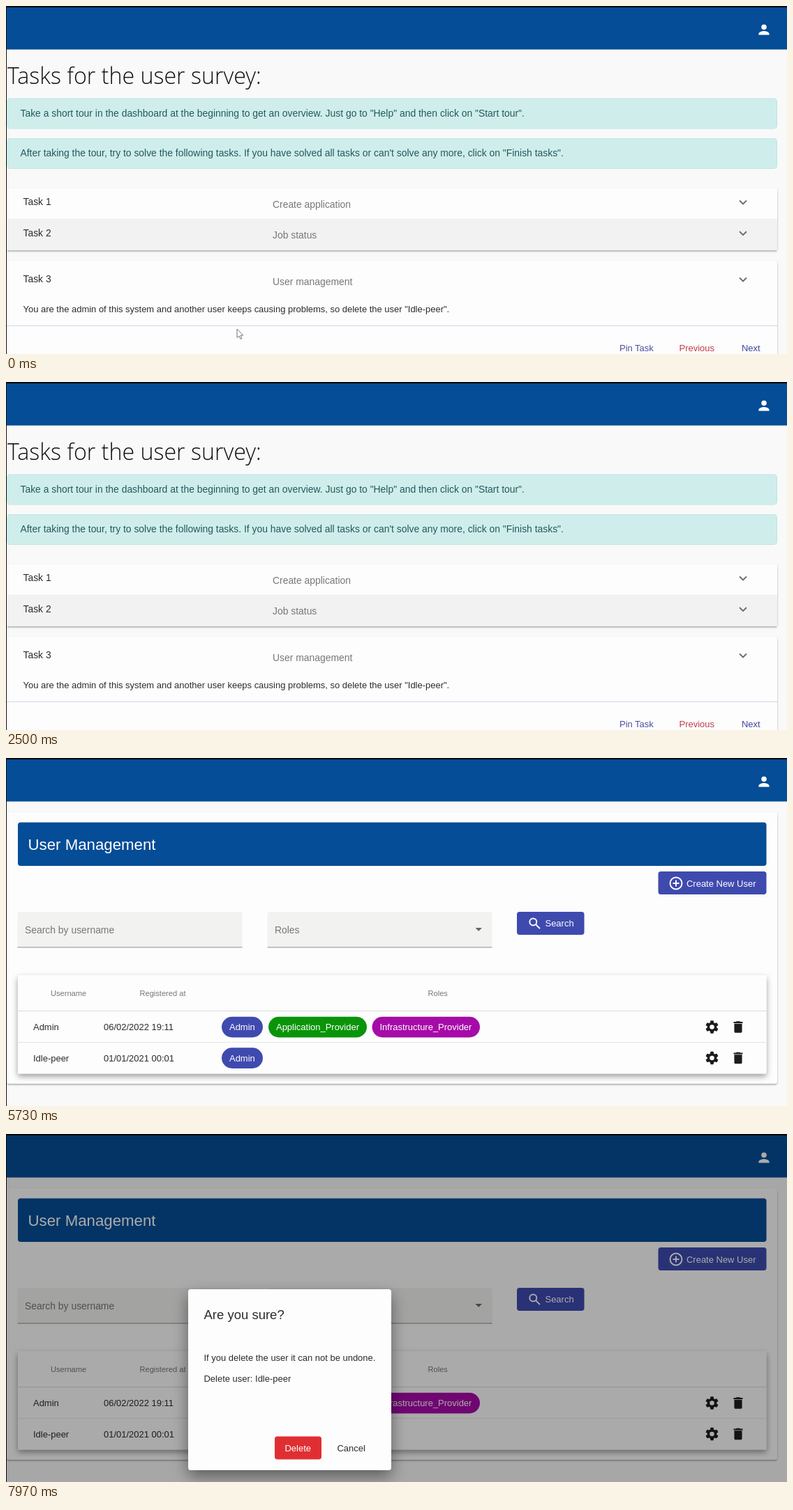
An HTML page that plays this animation: 1119 by 500 pixels, repeating every 8000 ms.

```html
<!DOCTYPE html>
<html lang="en">
<head>
<meta charset="utf-8">
<title>User management tasks</title>
<style>
html, body { margin: 0; width: 100%; height: 100%; overflow: hidden; background: #f9f9f9; }
svg { display: block; width: 1119px; height: 500px; font-family: "Liberation Sans", Arial, sans-serif; }
.heading { font-family: "Open Sans", "Noto Sans", sans-serif; font-weight: 300; }
</style>
</head>
<body>
<svg id="stage" viewBox="0 0 1119 500">
  <defs>
    <filter id="low" x="-5%" y="-10%" width="110%" height="125%">
      <feDropShadow dx="0" dy="1.5" stdDeviation="1.2" flood-color="#303050" flood-opacity=".42"/>
    </filter>
    <filter id="high" x="-5%" y="-15%" width="110%" height="140%">
      <feDropShadow dx="0" dy="4" stdDeviation="4.5" flood-opacity=".38"/>
    </filter>
    <filter id="modal" x="-20%" y="-20%" width="140%" height="150%">
      <feDropShadow dx="0" dy="9" stdDeviation="11" flood-opacity=".45"/>
    </filter>
    <path id="trash" transform="scale(.927) translate(-12 -12)" d="M6 19c0 1.1.9 2 2 2h8c1.1 0 2-.9 2-2V7H6zM19 4h-3.500l-1-1h-5l-1 1H5v2h14z"/>
    <path id="person" transform="scale(.95) translate(-12 -12)" d="M12 12a4 4 0 1 0 0-8a4 4 0 0 0 0 8zm0 2c-2.670 0-8 1.340-8 4v2h16v-2c0-2.660-5.330-4-8-4z"/>
    <g id="gear"></g>
  </defs>
  <rect width="1119" height="500" fill="#f9f9f9"/>
  <g id="tasks"></g>
  <g id="users"></g>
  <g id="bar"></g>
  <rect id="dim" y="2" width="1119" height="498"/>
  <g id="dialog"></g>
  <g id="cursor" fill="#fdfdfd" stroke="#77777c" stroke-width="1" stroke-linejoin="round">
    <path id="arrow" d="M0 0V12.500L3 10L5 14.500L7 13.600L5 9.200H8.700Z"/>
    <path id="hand" d="M-1.500 8V1Q-1.500-.5 0-.5T1.500 1V6L6.500 7Q8.500 7.500 8.500 9L7.500 14V16.500H0L-5 11Q-6 8.500-4 8.500L-1.500 10Z"/>
  </g>
</svg>
<script>
const LOOP = 8000;
const BODY = 13.9, SMALL = 12.98, HEADER = 11.1;
const BLUE = '#054d97', INDIGO = '#3f4aaf', CARD = '#fdfdfd', INK = '#2c2c2c', MUTED = '#777';
const TARGET_USER = 'Idle-peer';
const $ = id => document.getElementById(id);

const text = (x, y, label, size = SMALL, fill = INK, extra = '') =>
  `<text x="${x}" y="${y}" font-size="${size}" fill="${fill}" ${extra}>${label}</text>`;
const box = (x, y, w, h, fill, r = 0, extra = '') =>
  `<rect x="${x}" y="${y}" width="${w}" height="${h}" rx="${r}" fill="${fill}" ${extra}/>`;
const line = (x1, x2, y, color) =>
  `<path d="M${x1} ${y}H${x2}" stroke="${color}"/>`;
const icon = (id, x, y, fill) => `<use href="#${id}" x="${x}" y="${y}" fill="${fill}"/>`;
const chevron = y =>
  `<path d="M1051 ${y - 2.5}l5 5l5-5" fill="none" stroke="#6a6a6a" stroke-width="1.800"/>`;

const alertBox = (y, label) =>
  box(1.5, y + .5, 1103, 43, '#cfeeeb', 4, 'stroke="#bfe4e6"') +
  text(20.5, y + 26, label, BODY, '#24595c');
const taskRow = (y, number, label) =>
  text(24.5, y, 'Task ' + number, BODY) + text(382, y + 3.5, label, BODY, MUTED) + chevron(y - 4);
const field = (x, label) =>
  `<path d="M${x} 272V225q0-4 4-4h314q4 0 4 4v47z" fill="#f2f2f1"/>` +
  line(x, x + 322, 272, '#8d8d8d') + text(x + 10.5, 252, label, BODY, MUTED);
const chip = (x, y, w, label, fill) =>
  box(x, y, w, 29.6, fill, 14.8) + text(x + 11, y + 19.2, label, SMALL, '#fff');
const userRow = (y, name, date) =>
  text(39, y, name) + text(140, y, date) + chip(309, y - 19.2, 59, 'Admin', INDIGO) +
  icon('gear', 1011.5, y - 4.5, '#1c1c1c') + icon('trash', 1049, y - 4.5, '#1c1c1c');

$('gear').innerHTML =
  '<path fill-rule="evenodd" d="M-6.700 0a6.700 6.700 0 1 0 13.400 0a6.700 6.700 0 1 0-13.400 0zM-3.300 0a3.300 3.300 0 1 1 6.600 0a3.300 3.300 0 1 1-6.600 0z"/>' +
  Array.from({length: 6}, (_, i) =>
    `<path transform="rotate(${i * 60})" d="M-2.800-5.500L-2-9.200H2L2.800-5.500z"/>`).join('');

$('bar').innerHTML =
  box(0, 0, 1119, 62.5, BLUE) + box(0, 0, 1119, 2, '#050505') + box(0, 0, 1, 500, '#111') +
  icon('person', 1086, 34, '#fff');

$('tasks').innerHTML =
  text(2, 111.5, 'Tasks for the user survey:', 32.2, '#111', 'class="heading"') +
  alertBox(132.5, 'Take a short tour in the dashboard at the beginning to get an overview. Just go to "Help" and then click on "Start tour".') +
  alertBox(190, 'After taking the tour, try to solve the following tasks. If you have solved all tasks or can\'t solve any more, click on "Finish tasks".') +
  box(1, 262, 1104, 89, CARD, 3, 'filter="url(#low)"') +
  box(1, 305.5, 1104, 45.5, '#f2f2f2') +
  taskRow(286, 1, 'Create application') +
  taskRow(330.5, 2, 'Job status') +
  box(1, 366, 1104, 150, CARD, 4, 'filter="url(#low)"') +
  taskRow(397, 3, 'User management') +
  text(24.5, 439.5, `You are the admin of this system and another user keeps causing problems, so delete the user "${TARGET_USER}".`) +
  line(1, 1105, 459.5, '#d3d3ee') +
  text(879, 496, 'Pin Task', SMALL, '#4a4f9c') +
  text(964.5, 496, 'Previous', SMALL, '#c23a48') +
  text(1054, 496, 'Next', SMALL, '#41479a');

$('users').innerHTML =
  box(1, 78, 1104, 390, CARD, 4, 'filter="url(#low)"') +
  box(17, 92.5, 1072.5, 62.5, BLUE, 4) +
  text(31.5, 131.5, 'User Management', 22.25, '#fff') +
  box(934.5, 163, 155, 33, INDIGO, 3.7) +
  '<path d="M951.500 180a8.500 8.500 0 1 0 17 0a8.500 8.500 0 1 0-17 0M960 175.500v9M955.500 180h9" fill="none" stroke="#fff" stroke-width="1.900"/>' +
  text(975, 184.5, 'Create New User', SMALL, '#fff') +
  field(16.5, 'Search by username') + field(374.5, 'Roles') +
  '<path d="M672.500 244h9.500l-4.750 4.800z" fill="#666"/>' +
  box(732, 221, 96.5, 33, INDIGO, 3.7) +
  '<path d="M750.300 235.500a5 5 0 1 0 10 0a5 5 0 1 0-10 0M759 239.200l6 6" fill="none" stroke="#fff" stroke-width="1.900"/>' +
  text(772.5, 242, 'Search', SMALL, '#fff') +
  box(17, 312, 1072.5, 141.5, CARD, 2, 'filter="url(#high)"') +
  text(64, 342, 'Username', HEADER, MUTED) +
  text(191.5, 342, 'Registered at', HEADER, MUTED) +
  text(604.5, 342, 'Roles', HEADER, MUTED) +
  line(17, 1089.5, 363.5, '#d9d9dc') + line(17, 1089.5, 408.5, '#e5e5e3') +
  userRow(391, 'Admin', '06/02/2022 19:11') +
  chip(376, 371.8, 141, 'Application_Provider', '#0a940a') +
  chip(524.5, 371.8, 154.5, 'Infrastructure_Provider', '#a60ba8') +
  userRow(435.5, TARGET_USER, '01/01/2021 00:01');

$('dialog').innerHTML =
  box(261, 223, 291, 260, CARD, 4, 'filter="url(#modal)"') +
  text(283.5, 266, 'Are you sure?', 18.5) +
  text(283.5, 326, 'If you delete the user it can not be undone.') +
  text(283.5, 355.5, 'Delete user: ' + TARGET_USER) +
  box(385, 434.5, 67, 33, '#e02f33', 3.7) +
  text(399.5, 455.5, 'Delete', SMALL, '#fff') +
  text(474.5, 455.5, 'Cancel');

const PAGE_SWITCH = 2560, DIALOG_OPEN = 7780;
// Pointer stops: time, x, y
const STOPS = [
  [0, 331, 464], [1650, 331, 464], [2050, -20, 340], [2650, -20, 340],
  [3080, 987, 198], [3300, 985, 203], [4170, 960, 472], [4500, 935, 505],
  [4501, 1130, 400], [6950, 1130, 400], [7450, 1038, 432], [LOOP, 1038, 432]
];
const clamp = v => Math.max(0, Math.min(1, v));
const ease = v => v * v * (3 - 2 * v);

function pointerAt(t) {
  const next = Math.max(1, STOPS.findIndex(stop => stop[0] > t));
  const [t0, x0, y0] = STOPS[next - 1], [t1, x1, y1] = STOPS[next];
  const k = ease(clamp((t - t0) / (t1 - t0)));
  return [x0 + (x1 - x0) * k, y0 + (y1 - y0) * k];
}

const overButton = (x, y) =>
  (x > 934 && x < 1090 && y > 163 && y < 200) || (x > 1033 && x < 1066 && y > 415 && y < 449);
const show = (id, on) => $(id).setAttribute('display', on ? 'inline' : 'none');

function render(t) {
  const onUsers = t >= PAGE_SWITCH, open = t >= DIALOG_OPEN;
  show('tasks', !onUsers);
  show('users', onUsers);

  const fade = clamp((t - DIALOG_OPEN) / 170);
  const scale = .7 + .3 * (1 - (1 - fade) ** 3);
  $('dim').setAttribute('opacity', .33 * fade);
  show('dialog', open);
  $('dialog').setAttribute('opacity', fade);
  $('dialog').setAttribute('transform', `translate(406.5 353) scale(${scale}) translate(-406.5 -353)`);

  const [x, y] = pointerAt(t);
  const pointing = onUsers && overButton(x, y);
  show('cursor', !open);
  $('cursor').setAttribute('transform', `translate(${x} ${y})`);
  show('hand', pointing);
  show('arrow', !pointing);
}

const start = performance.now();
function tick() {
  render((performance.now() - start) % LOOP);
  requestAnimationFrame(tick);
}
tick();
</script>
</body>
</html>
```
